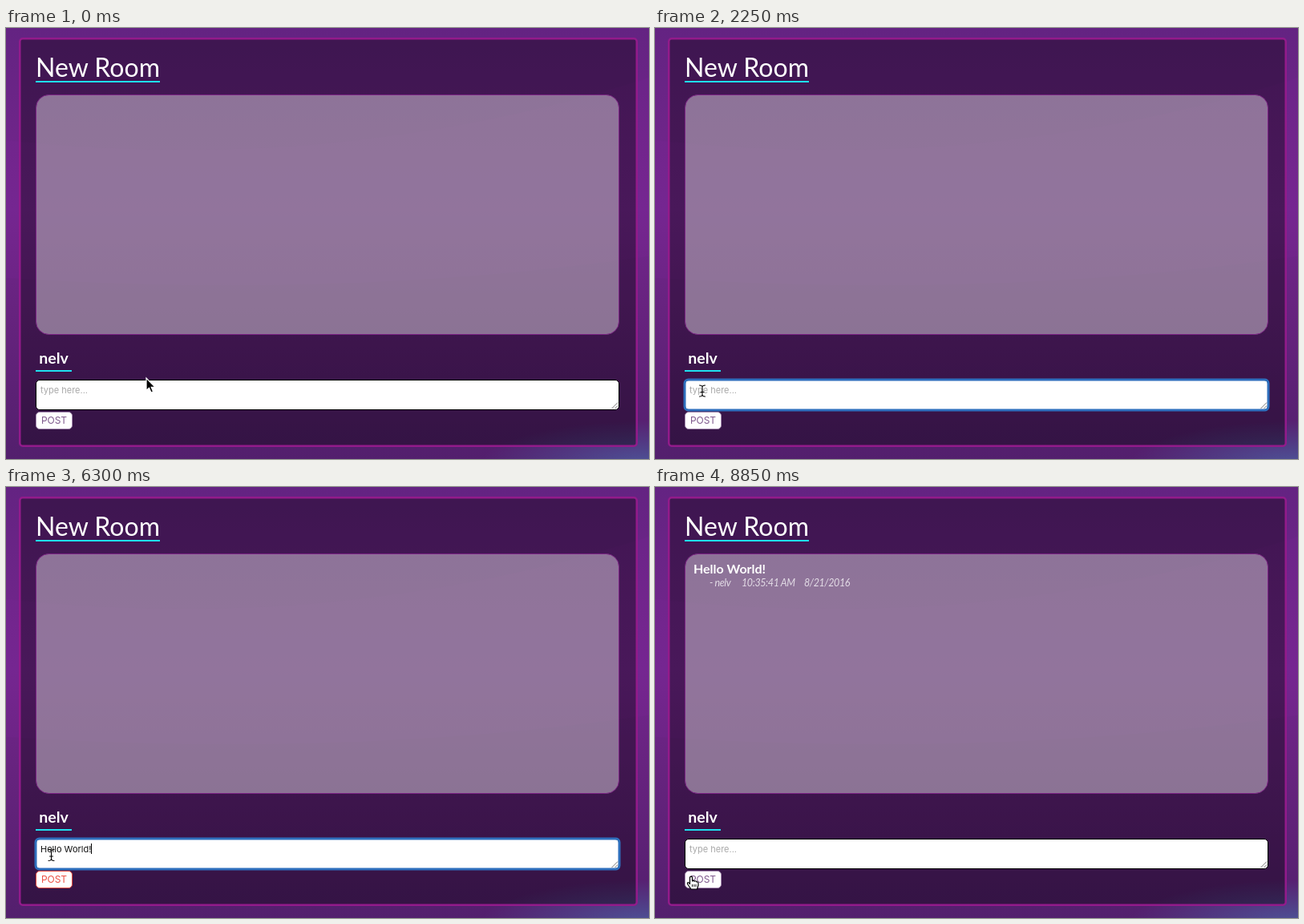
An HTML page that plays this animation: 802 px wide and 538 px high, repeating every 9 s.

```html
<!DOCTYPE html>
<html lang="en">
<head>
<meta charset="utf-8">
<title>Chat room</title>
<style>
  html, body { margin: 0; width: 100%; height: 100%; overflow: hidden; background: #5c2178; }
  svg { display: block; width: 802px; height: 538px; }
  text { white-space: pre; font-family: Lato, "Open Sans", sans-serif; fill: #fff; }
  .title { font-size: 32px; }
  .user { font-size: 19.5px; font-weight: 700; text-anchor: middle; }
  .message { font-size: 16px; font-weight: 700; }
  .meta { font-size: 12.5px; font-style: italic; letter-spacing: -.4px; fill: #e3dce6; }
  .field, .button { font-family: Inter, "Liberation Sans", sans-serif; }
  .field { font-size: 11px; fill: #111; }
  .hint { fill: #a9a9a9; }
  .button { font-size: 12px; text-anchor: middle; }
</style>
</head>
<body>
<svg viewBox="0 0 802 538">
  <defs>
    <linearGradient id="sky" x1="0" y1="0" x2="0" y2="1">
      <stop offset="0" stop-color="#642382"/>
      <stop offset=".25" stop-color="#6e2589"/>
      <stop offset=".42" stop-color="#73268e"/>
      <stop offset=".65" stop-color="#67237f"/>
      <stop offset="1" stop-color="#531f6d"/>
    </linearGradient>
    <radialGradient id="glow" gradientUnits="userSpaceOnUse" cx="0" cy="0" r="1"
      gradientTransform="translate(802 545) scale(210 55)">
      <stop offset="0" stop-color="#4d5498"/>
      <stop offset="1" stop-color="#4d5498" stop-opacity="0"/>
    </radialGradient>
  </defs>

  <rect width="802" height="538" fill="url(#sky)"/>
  <path d="M0 140 Q420 185 802 62 V285 Q420 340 0 312Z" fill="#8a2aa8" opacity=".1"/>
  <rect width="802" height="538" fill="url(#glow)"/>

  <rect x="17.25" y="13.25" width="769.5" height="508.5" rx="3.5" fill="#000" fill-opacity=".38"
    stroke="#931b8b" stroke-width="2.5"/>

  <text class="title" x="37" y="61">New Room</text>
  <rect x="37" y="66" width="155" height="2" fill="#1fe0f0"/>

  <rect x="37.5" y="83.5" width="727" height="299" rx="16" fill="#fff" fill-opacity=".4"
    stroke="#7d2485"/>
  <g id="post">
    <text class="message" x="48" y="108">Hello World!</text>
    <text class="meta" x="68" y="124">- nelv</text>
    <text class="meta" x="108" y="124">10:35:41 AM</text>
    <text class="meta" x="186" y="124">8/21/2016</text>
  </g>

  <text class="user" x="59.5" y="419">nelv</text>
  <rect x="37" y="427" width="45" height="2" fill="#1fe0f0"/>

  <rect x="37.5" y="439.5" width="727" height="37" rx="4.5" fill="#fff" stroke="#000"/>
  <rect id="ring" x="37" y="439" width="728" height="38" rx="4.5" fill="none"
    stroke="#2e6fbd" stroke-width="3"/>
  <path d="M755.5 475 L763 467.5 M759.5 475 L763 471.5" stroke="#777" fill="none"/>
  <text id="hint" class="field hint" x="43" y="456">type here...</text>
  <text id="typed" class="field" x="43" y="456"></text>
  <rect id="caret" y="445" width="1" height="13"/>

  <rect id="box" x="37.5" y="479.5" width="45" height="21" rx="4.5"/>
  <text id="label" class="button" x="60" y="494">POST</text>

  <g id="cursor">
    <path id="arrow" d="M0 0 V15.5 L3.5 12.2 L6 18 L8.6 16.9 L6.2 11.3 H11Z"
      stroke="#fff" stroke-width="1.2"/>
    <g id="beam" fill="none" stroke-linecap="round">
      <path d="M-3.5 -7 Q0 -7 0 -4.5 Q0 -7 3.5 -7 M0 -5 V5 M-3.5 7 Q0 7 0 4.5 Q0 7 3.5 7 M-2 1.5 H2"
        stroke="#000" stroke-width="1.1"/>
    </g>
    <g id="hand" stroke="#000" stroke-linejoin="round">
      <path d="M-1.5 1.2 Q0 -1 1.5 1.2 V6 Q3 4.5 4.2 6.2 Q6 5 6.8 7 Q8.8 6.5 9 8.5 V11 L7.5 16 H0 L-4.5 9.5 Q-5 7 -2.8 8 L-1.5 9.5Z"
        fill="#fff" stroke-width="1.2"/>
      <path d="M1.5 10 V13 M3.8 10 V13 M6 10 V13" stroke-width=".9"/>
    </g>
  </g>
</svg>
<script>
  const LOOP = 9000, STEP = 150;
  const el = id => document.getElementById(id);
  const show = (id, on) => el(id).style.display = on ? '' : 'none';
  const within = (t, a, b) => t >= a && t < b;
  const ramp = (t, a, b) => Math.min(1, Math.max(0, (t - a) / (b - a)));
  const mix = (a, b, k) => a.map((v, i) => v + (b[i] - v) * k);
  const rgb = c => `rgb(${c.map(Math.round)})`;

  const message = 'Hello World!';
  // When each character has been typed
  const keys = [3600, 3750, 4050, 4200, 4350, 4650, 5250, 5400, 5550, 5550, 5850, 6150];
  const FOCUS = 1950, BLUR = 7350, SENT = 7500;
  const caretOff = [[2250, 2700], [3300, 3600], [6600, 7050]];

  // Pointer path: time, x, y
  const path = [
    [0, 175, 437], [600, 112, 463], [1050, 74, 465], [1200, 74, 465], [1800, 59, 453],
    [6150, 59, 453], [6450, 54, 466], [6750, 43, 485], [7050, 44, 486],
    [8100, 44, 486], [8250, 45, 486], [LOOP, 45, 486]
  ];

  const idle = { fill: [255, 255, 255], edge: [166, 140, 176], text: [126, 88, 140] };
  const ready = { fill: [255, 255, 255], edge: [232, 74, 62], text: [236, 78, 66] };
  const hover = { fill: [255, 98, 56], edge: [255, 98, 56], text: [255, 255, 255] };

  function pointAt(t) {
    const i = path.findIndex(p => p[0] > t);
    const a = path[i - 1], b = path[i];
    return mix(a, b, ramp(t, a[0], b[0])).slice(1);
  }

  function drawPointer(t) {
    const [x, y] = pointAt(t);
    const kind = y > 478 ? 'hand' : y > 439 ? 'beam' : 'arrow';
    for (const k of ['arrow', 'beam', 'hand']) show(k, k === kind);
    show('cursor', !within(t, 3600, 6300));
    el('cursor').setAttribute('transform', `translate(${x} ${y})`);
  }

  function drawField(t) {
    const count = t < SENT ? keys.filter(k => k <= t).length : 0;
    const typed = el('typed');
    typed.textContent = message.slice(0, count);
    show('hint', !count);
    show('ring', within(t, FOCUS, BLUR));
    show('caret', within(t, FOCUS, BLUR) && !caretOff.some(([a, b]) => within(t, a, b)));
    const width = count ? typed.getComputedTextLength() : 0;
    el('caret').setAttribute('x', Math.round(43 + width));
  }

  function drawButton(t) {
    const sent = 1 - ramp(t, SENT - STEP, SENT + STEP);
    const red = ramp(t, 3500, 3650) * sent;
    const hot = ramp(t, 6650, 6950) * sent;
    const tint = part => rgb(mix(mix(idle[part], ready[part], red), hover[part], hot));
    el('box').style.fill = tint('fill');
    el('box').style.stroke = tint('edge');
    el('label').style.fill = tint('text');
    el('label').style.fontWeight = hot > .5 ? 600 : 400;
  }

  function draw(now) {
    const t = Math.floor(now % LOOP / STEP) * STEP;
    drawField(t);
    drawButton(t);
    drawPointer(t);
    show('post', t >= SENT);
  }

  let start;
  function tick(now) {
    start ??= now;
    draw(now - start);
    requestAnimationFrame(tick);
  }
  draw(0);
  requestAnimationFrame(tick);
</script>
</body>
</html>
```
